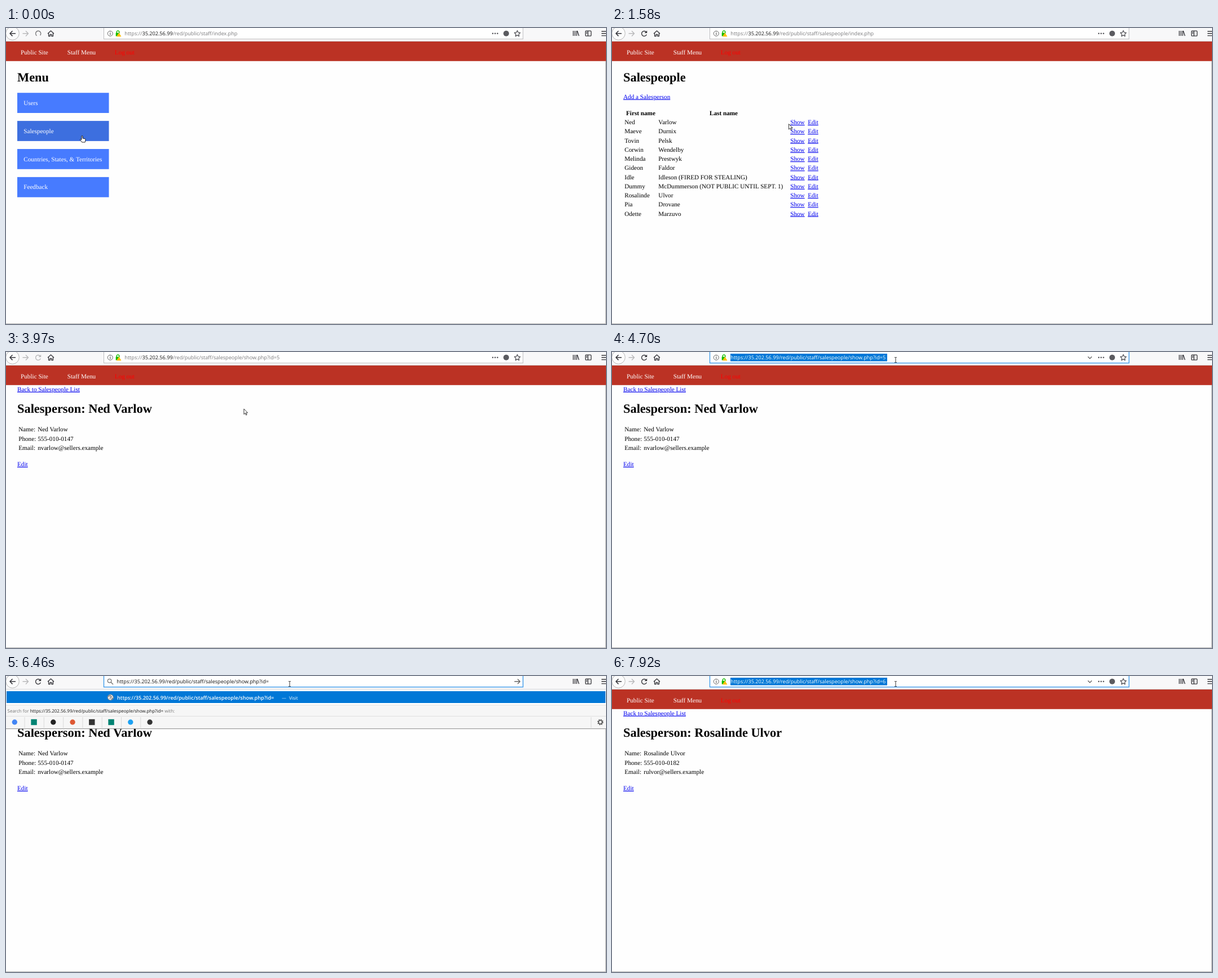
Recreate the animation shown at these times as an HTML page. Size 1064 by 526 pixels, loop 8000 ms.

```html
<!DOCTYPE html>
<html lang="en">
<head>
<meta charset="utf-8">
<title>Staff area</title>
<style>
html, body { margin: 0; width: 100%; height: 100%; overflow: hidden; background: #fefefe; }
svg { display: block; width: 100vw; height: 100vh; }
text { font: 11.2px "Liberation Serif", serif; text-rendering: geometricPrecision; white-space: pre; }
.title { font-size: 22.4px; font-weight: bold; }
.bold { font-weight: bold; }
.link { fill: #0000ee; text-decoration: underline; }
.ui { font: 9.15px "Open Sans", "Noto Sans", sans-serif; }
.row { font-weight: 600; }
.small { font-size: 8px; }
.line { fill: none; stroke-width: 1.4; stroke-linejoin: round; }
</style>
</head>
<body>
<svg id="stage" viewBox="0 0 1064 526"></svg>
<script>
const LOOP = 8000;
const DARK = '#38383d', GREY = '#7b7b7d', PALE = '#b9b9bb', BLUE = '#0078d7';
const HOST = '35.202.56.99', FOLDER = '/red/public/staff/';

const salespeople = [
  'Ned,Varlow', 'Maeve,Durnix', 'Tovin,Pelsk', 'Corwin,Wendelby', 'Melinda,Prestwyk',
  'Gideon,Faldor', 'Idle,Idleson (FIRED FOR STEALING)',
  'Dummy,McDummerson (NOT PUBLIC UNTIL SEPT. 1)', 'Rosalinde,Ulvor', 'Pia,Drovane', 'Odette,Marzuvo'
].map(entry => entry.split(','));

const contacts = {
  first: ['Ned Varlow', '555-010-0147', 'nvarlow@sellers.example'],
  second: ['Rosalinde Ulvor', '555-010-0182', 'rulvor@sellers.example']
};

// The picture is refreshed in bursts: first time, last time, number of refreshes.
const bursts = [[0, 0, 1], [120, 1160, 8], [1310, 2340, 7], [2490, 3390, 8], [3540, 4550, 8],
  [4700, 5090, 4], [6460, 6610, 2], [6890, 7920, 8]];

// Each entry changes part of the state from its time on.
const timeline = [
  [0, { page: 'menu', path: 'index.php', mode: 'idle', reload: 'arc', cursor: 'hand' }],
  [120, { reload: 'stop' }],
  [410, { page: 'list', path: 'salespeople/index.php', reload: 'off', cursor: 'arrow' }],
  [1000, { reload: 'on', cursor: 'hand' }],
  [1300, { cursor: 'arrow' }],
  [1990, { cursor: 'hand' }],
  [2740, { reload: 'stop' }],
  [3250, { path: 'salespeople/show.php?id=5' }],
  [3530, { page: 'first', reload: 'off', cursor: 'arrow' }],
  [4250, { reload: 'on' }],
  [4400, { cursor: 'beam', chevron: true }],
  [4690, { mode: 'focus', selected: 'all' }],
  [4820, { selected: '' }],
  [5080, { selected: 'last' }],
  [6450, { mode: 'typing', selected: '', path: 'salespeople/show.php?id=', rows: 1 }],
  [6600, { path: 'salespeople/show.php?id=6', rows: 2 }],
  [6880, { mode: 'pending', rows: 0, chevron: false }],
  [7030, { reload: 'stop' }],
  [7180, { page: 'second', mode: 'idle', reload: 'off', chevron: true }],
  [7760, { reload: 'on' }],
  [7910, { mode: 'focus', selected: 'all' }]
];

// Cursor hot spot: time, x, y.
const cursorPath = [[0, 135, 191], [270, 135, 191], [1010, 325, 268], [1160, 339, 284], [1310, 327, 230],
  [1470, 313, 170], [1830, 313, 170], [2340, 326, 160], [3390, 326, 163], [3540, 345, 150],
  [3970, 421, 101], [4550, 497, 14], [4700, 503, 14], [LOOP, 503, 14]];

const text = (x, y, content, cls = '', fill = '') =>
  `<text x="${x}" y="${y}" class="${cls}"${fill && ` fill="${fill}"`}>${content}</text>`;
const rect = (x, y, w, h, fill, extra = '') =>
  `<rect x="${x}" y="${y}" width="${w}" height="${h}" fill="${fill}" ${extra}/>`;
const disc = (x, y, r, fill, extra = '') => `<circle cx="${x}" cy="${y}" r="${r}" fill="${fill}" ${extra}/>`;
const line = (d, stroke = DARK, extra = '') => `<path class="line" d="${d}" stroke="${stroke}" ${extra}/>`;
const span = (content, fill) => `<tspan fill="${fill}">${content}</tspan>`;

function snap(t) {
  const [start, end, count] = bursts.findLast(burst => t >= burst[0]);
  const step = (end - start) / Math.max(1, count - 1);
  const index = step ? Math.min(count - 1, Math.floor((t - start + 6) / step)) : 0;
  return Math.round(start + index * step);
}

function stateAt(t) {
  return Object.assign({}, ...timeline.filter(([start]) => start <= t).map(([, change]) => change));
}

function cursorAt(t) {
  const next = Math.max(1, cursorPath.findIndex(([time]) => time > t));
  const [t0, x0, y0] = cursorPath[next - 1], [t1, x1, y1] = cursorPath[next];
  const k = (t - t0) / (t1 - t0);
  return [x0 + (x1 - x0) * k, y0 + (y1 - y0) * k];
}

function menuPage() {
  const items = ['Users', 'Salespeople', 'Countries, States, &amp; Territories', 'Feedback'];
  return text(20, 95, 'Menu', 'title') + items.map((item, i) => {
    const y = 115.2 + i * 49.9;
    return rect(20, y, 162.5, 35.8, i === 1 ? '#3d6fdf' : '#477bff') + text(31.2, y + 21.5, item, '', '#fff');
  }).join('');
}

function listPage() {
  return text(20, 95, 'Salespeople', 'title') + text(20, 125.6, 'Add a Salesperson', 'link') +
    text(25, 155, 'First name', 'bold') + text(173, 155, 'Last name', 'bold') +
    salespeople.map(([first, last], i) => {
      const y = 171 + i * 16.25;
      return text(22.2, y, first) + text(82.3, y, last) +
        text(316.2, y, 'Show', 'link') + text(347.2, y, 'Edit', 'link');
    }).join('');
}

function contactPage(contact) {
  return text(20, 69.7, 'Back to Salespeople List', 'link') +
    text(20, 108.4, 'Salesperson: ' + contact[0], 'title') +
    ['Name:', 'Phone:', 'Email:'].map((label, i) => {
      const y = 141.4 + i * 16.25;
      return text(22.2, y, label) + text(56.2, y, contact[i]);
    }).join('') + text(20, 203, 'Edit', 'link');
}

function pageView(page) {
  const body = page === 'menu' ? menuPage() : page === 'list' ? listPage() : contactPage(contacts[page]);
  return rect(0, 24, 1064, 34.8, '#bb3224') + text(26, 46.7, 'Public Site', '', '#fff') +
    text(108.7, 46.7, 'Staff Menu', '', '#fff') + text(192.8, 46.7, 'Log out', '', '#f00') + body +
    rect(1063, 59, 1, 467, '#a5a5a5') + rect(0, 525, 1064, 1, '#b0b0b0');
}

function reloadIcon(kind) {
  if (kind === 'stop') return line('M53 6l8 8m0-8l-8 8');
  const color = kind === 'off' ? PALE : DARK;
  if (kind === 'arc') return line('M54.5 13.6A4.6 4.6 0 1 1 60.5 13', GREY);
  return line('M60.6 7.2A4.5 4.5 0 1 0 61.3 11.5', color) + `<path d="M62.2 4.5v4.6h-4.6z" fill="${color}"/>`;
}

function toolbar(state) {
  return rect(0, 0, 1064, 24, '#f8f8f9') + rect(0, 23, 1064, 1, '#d5d5d7') +
    disc(11.5, 9.5, 11.8, '#fcfcfc', 'stroke="#b8b8b8"') +
    line('M17 9.8H7m4.5-4.6L7 9.8l4.5 4.6', DARK, 'style="stroke-width:1.6"') +
    line('M29.5 9.8h10m-4.5-4.6l4.5 4.6-4.5 4.6', PALE) + reloadIcon(state.reload) +
    line('M74 10l5.5-5 5.5 5M75.6 9.5v5h2.6v-3h2.6v3h2.6v-5') +
    line('M1006 5v9m3-9v9m3-9v9m1-9l3 9') +
    rect(1027.6, 5.2, 10, 9, 'none', `rx="1.2" stroke="${DARK}" stroke-width="1.3"`) +
    line('M1032 5v9m-3-6.5h1.6m-1.6 2h1.6') + line('M1056 6h8m-8 3.8h8m-8 3.8h8');
}

function addressBar({ mode, path, selected, chevron }) {
  const focused = mode === 'focus' || mode === 'typing';
  const identity = mode === 'idle' || mode === 'focus';
  const x = identity ? 210.3 : 196.3;
  const [hostColor, restColor] = selected === 'all' ? ['#fff', '#fff'] : focused ? ['#161616', '#161616'] : ['#161616', GREY];
  const tail = selected === 'last' ? path.slice(0, -1) + span(path.slice(-1), '#fff') : path;
  let view = rect(173.5, -2, 743.3, 21.6, '#fff',
    `stroke="${focused ? '#3f9bea' : '#bdbdbf'}" stroke-width="${focused ? 1.4 : 1}"`);
  if (selected === 'all') view += rect(210, 3, 278, 13.5, BLUE);
  if (selected === 'last') view += rect(482, 3, 6, 13.5, BLUE);
  view += text(x, 13.2, span('https://', restColor) + span(HOST, hostColor) + span(FOLDER + tail, restColor), 'ui');
  if (identity) {
    view += disc(184.8, 9.8, 4.5, 'none', 'stroke="#666"') + line('M184.8 9v3.3m0-5.2v1', '#666') +
      line('M196.2 9V7.2a2.3 2.3 0 0 1 4.6 0V9', '#12bc00') + rect(194.7, 8.5, 6.5, 6, '#12bc00') +
      '<path d="M200.2 8.2l4.3 7h-8.6z" fill="#ffbf00"/>' +
      [863.2, 867.4, 871.6].map(dotX => disc(dotX, 9.8, 1.2, '#4a4a4f')).join('') +
      disc(887, 9.8, 5, '#5b5b60') +
      line('M906.7 4.6l1.6 3.3 3.6.5-2.6 2.6.6 3.6-3.2-1.7-3.2 1.7.6-3.6-2.6-2.6 3.6-.5z', '#4a4a4f', 'style="stroke-width:1.2"');
    if (chevron) view += line('M844 8.3l3.4 3.4 3.4-3.4', '#666');
  } else {
    view += disc(183.6, 8.6, 3.3, 'none', 'stroke="#777" stroke-width="1.3"') + line('M186 11l4 4', '#777');
  }
  if (mode === 'typing') view += line('M901.5 9.8h10m-4.2-4.2l4.2 4.2-4.2 4.2', '#666');
  return view;
}

function globe(y) {
  return disc(185.3, y, 5, '#e4e4e4', 'stroke="#8a8a8a"') +
    line(`M181 ${y - 2}l4-1 2 2-3 3m3 2l2-3`, '#777');
}

function suggestions({ rows, path }) {
  if (!rows) return '';
  const url = 'https://' + HOST + FOLDER + path, end = url.length > 61 ? 489 : 486;
  const shift = (rows - 1) * 23;
  let view = rect(0, 24, 1064, 70 + shift, '#fff') + rect(1, 27, 1062, 21, BLUE) + globe(38) +
    text(197, 41.6, url, 'ui row', '#fff') + text(end, 41.6, '—', 'ui small', '#d5eaff') +
    text(end + 13, 41.6, 'Visit', 'ui small', '#fff');
  if (rows > 1) view += globe(61) + text(197, 64.6, url, 'ui', '#161616');
  const separators = [...Array(7).keys()].map(i => 32.5 + i * 34.3).concat(1037);
  const engines = ['#4285f4', '#008373', '#222', '#de5833', '#333', '#008373', '#1da1f2', '#333'];
  return view + `<g transform="translate(0 ${shift})">` + rect(0, 51, 1064, 43, '#f6f6f6') +
    rect(0, 51, 1064, 1, '#e0e0e0') + rect(0, 71, 1064, 1, '#e0e0e0') +
    text(2.5, 64.5, span('Search for ', '#777') + span(url, '#161616') + span(' with:', '#777'), 'ui small') +
    separators.map(x => rect(x, 73, 1, 19, '#dadada')).join('') +
    engines.map((color, i) => {
      const x = 15.3 + i * 34.25;
      return [1, 4, 5].includes(i) ? rect(x - 5.2, 76.8, 10.4, 10.4, color) : disc(x, 82, 4.7, color);
    }).join('') +
    disc(1054, 82, 3.2, 'none', 'stroke="#555" stroke-width="1.6"') +
    disc(1054, 82, 4.6, 'none', 'stroke="#555" stroke-width="1.6" stroke-dasharray="1.8 1.81"') +
    rect(0, 93, 1064, 1.2, '#9d9d9d') + '</g>';
}

function cursorView(kind, [x, y]) {
  const shapes = {
    arrow: '<path d="M.5.5v9.6l2.2-2 1.6 3.5 1.5-.7-1.6-3.4h3z" fill="#fff" stroke="#222" stroke-width=".9"/>',
    hand: '<path d="M-1 1q1-1.3 2 0v4l4 .8q1.2.5 1 2l-.8 4.2h-5.5l-3-4q-.7-1.6 1-1.4l1.3 1z" fill="#fff" stroke="#111" stroke-width=".9"/>',
    beam: '<path d="M-2-4.5h1.5l.5.5.5-.5H2M0-4v8M-2 4.5h1.5l.5-.5.5.5H2" fill="none" stroke="#222" stroke-width=".9"/>'
  };
  return `<g transform="translate(${x} ${y})">${shapes[kind]}</g>`;
}

const stage = document.getElementById('stage');
let shown = -1;

function frame(now) {
  const t = snap(now % LOOP);
  if (t !== shown) {
    shown = t;
    const state = stateAt(t);
    stage.innerHTML = toolbar(state) + pageView(state.page) + addressBar(state) +
      suggestions(state) + cursorView(state.cursor, cursorAt(t));
  }
  requestAnimationFrame(frame);
}
frame(0);
</script>
</body>
</html>
```
